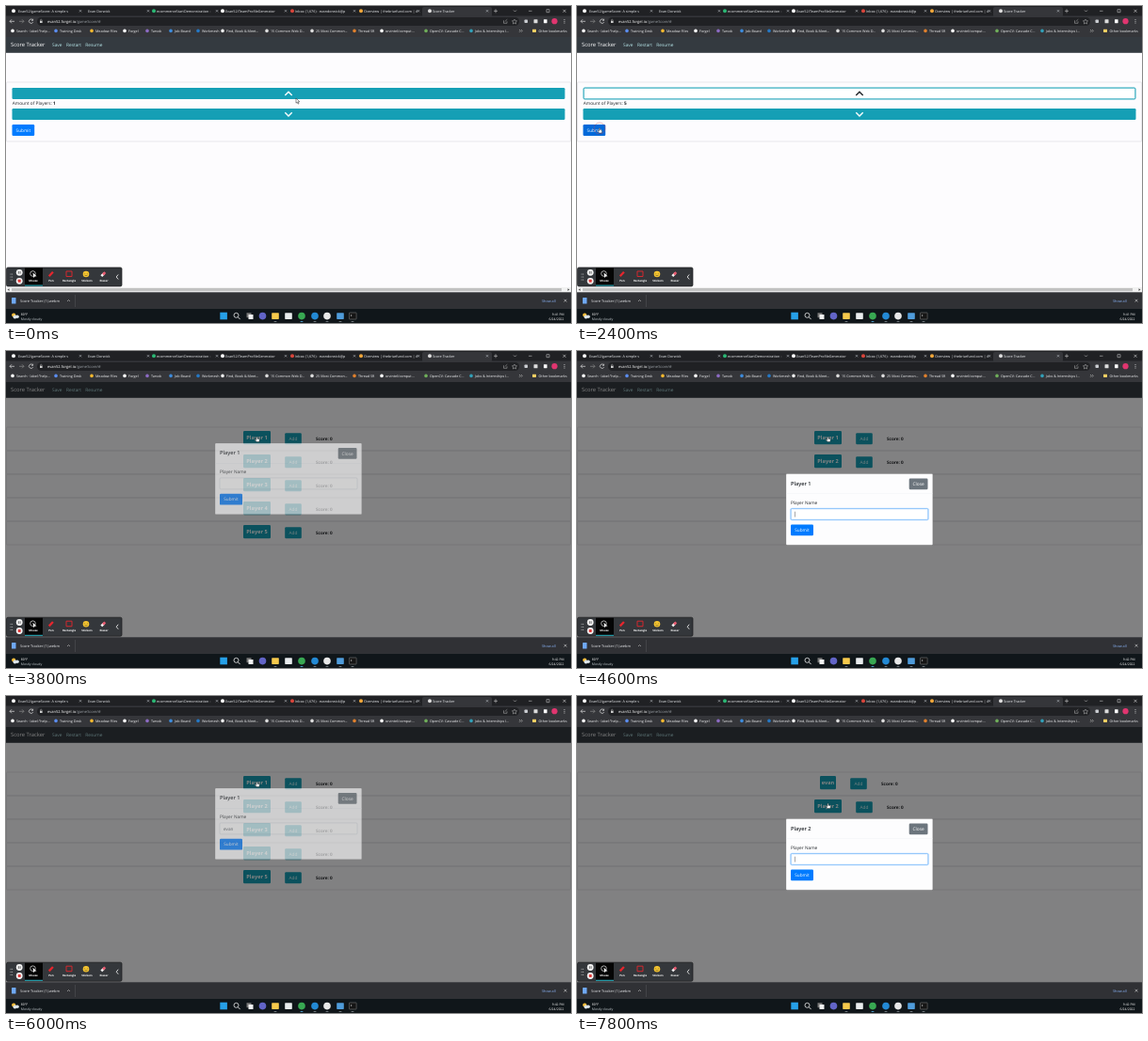
An HTML page for the animation above (8000 ms loop, 600 by 337 pixels).

```html
<!DOCTYPE html>
<html lang="en">
<head>
<meta charset="utf-8">
<title>Score Tracker</title>
<style>
  html, body { margin: 0; width: 100%; height: 100%; overflow: hidden; background: #202124; }
  svg { display: block; width: 100vw; height: 100vh; }
  text { font-family: "Open Sans", "Noto Sans", sans-serif; text-rendering: geometricPrecision; white-space: pre; }
</style>
</head>
<body>
<svg id="stage" viewBox="0 0 600 337">
  <g id="page"></g>
  <rect id="backdrop" y="33" width="600" height="272"/>
  <g id="modal"></g>
  <g id="scrollbar"></g>
  <g id="chrome"></g>
  <g id="recorder"></g>
  <g id="pointer"></g>
</svg>
<script>
const LOOP = 8000, STEP = 200;
const SCROLLBAR = 5.2;
const TEAL = '#159fb5', BLUE = '#007bff', INK = '#212529', BAR = '#35363a';
const $ = id => document.getElementById(id);

const rect = (x, y, w, h, fill, r = 0, extra = '') =>
  `<rect x="${x}" y="${y}" width="${w}" height="${h}" rx="${r}" fill="${fill}" ${extra}/>`;
const dot = (x, y, r, fill) => `<circle cx="${x}" cy="${y}" r="${r}" fill="${fill}"/>`;
const line = (d, stroke, width = 0.7) =>
  `<path d="${d}" fill="none" stroke="${stroke}" stroke-width="${width}"/>`;
const text = (x, y, size, fill, str, extra = '') =>
  `<text x="${x}" y="${y}" font-size="${size}" fill="${fill}" ${extra}>${str}</text>`;
const BOLD = 'font-weight="700"', MID = 'text-anchor="middle"', END = 'text-anchor="end"';
const cross = (x, y, s, color) => line(`M${x - s} ${y - s}l${2 * s} ${2 * s}m0 ${-2 * s}l${-2 * s} ${2 * s}`, color, 0.6);
const button = (x, y, w, h, fill, label, size = 4.7, color = '#fff', extra = '') =>
  rect(x, y, w, h, fill, 1.2) + text(x + w / 2, y + h / 2 + size * 0.36, size, color, label, `${MID} ${extra}`);

// Browser window, recorder toolbar and taskbar
function tabStrip() {
  const tabs = [
    [6, '#fff', 'Evan52/gameScore: A simple s', 79], [0, '', 'Evan Dorwick', 151],
    [155, '#2bb673', 'ecommerceStartDemonstration -', 224], [228, '#fff', 'Evan52/TeamProfileGenerator', 297],
    [302, '#d8453b', 'Inbox (1,676) - evandorwick@p', 370], [375, '#f0a63a', 'Overview | thebriarfund.com | A', 438],
    [448, '#ddd', 'Score Tracker', 511]
  ];
  return rect(0, 0, 600, 11, '#202124') + rect(442, 1, 74, 11, BAR, 2) +
    tabs.map(([x, color, title, close]) =>
      (color ? dot(x + 2, 5.3, 2, color) : '') +
      text(x ? x + 5 + (x === 6 ? 2 : 0) : 87, 6.7, 3.75, '#eceef1', title) +
      cross(close, 5.3, 1.1, '#bdc1c6')).join('') +
    line('M518 5.3h4m-2 -2v4', '#ccc', 0.6) +
    line('M539 4.5l1.5 1.5 1.5-1.5M555 5.3h3.5M574 3.7h3v3h-3z', '#ddd', 0.5) + cross(593, 5.3, 1.5, '#ddd');
}

function toolbar() {
  return rect(0, 10.5, 600, 22.5, BAR) + rect(33, 12, 512, 9, '#202124', 4.5) +
    line('M9 16.3h-5m2-2l-2 2 2 2', '#ddd') + line('M14 16.3h5m-2-2l2 2-2 2', '#888') +
    line('M28.5 15a2.2 2.2 0 1 0 .2 2m-.1-3.3v1.6h-1.6', '#ddd') +
    rect(36, 15.8, 2.6, 2.2, '#ccc') + line('M36.5 16v-1a.8 .8 0 0 1 1.6 0v1', '#ccc', 0.4) +
    text(44, 17.8, 4.05, '#fff', 'evan52.forgel.io<tspan fill="#9aa0a6">/gameScore/#</tspan>') +
    line('M528.5 15.3v3h3.5v-2m-2.3 .3l2.6-2.4M540 14l.8 1.7 1.8.2-1.4 1.2.4 1.9-1.6-1-1.6 1 .4-1.9-1.4-1.2 1.8-.2z', '#bbb', 0.5) +
    rect(550.5, 14.5, 3.5, 3.5, '#c9ccd1', 0.8) + rect(560.5, 14.2, 4, 4, '#ddd', 0.5) + rect(571, 14.2, 3.6, 4, '#fff', 0.4) +
    dot(582.5, 16.2, 3.1, '#e0356f') + [14.5, 16.2, 17.9].map(y => dot(593, y, 0.5, '#ddd')).join('');
}

function bookmarks() {
  const items = [
    [11, '#fff', 'Search · label:"help...'], [57, '#5b8def', 'Training Desk'], [95, '#f5b82e', 'Meadow Files'],
    [130, '#fff', 'Forgel'], [154, '#8d6bc4', 'Tarvok'], [179, '#3d8bdc', 'Job Board'], [208, '#2478c6', 'Workmesh'],
    [234, '#eee', 'Find, Book &amp; Meet...'], [281, '#ddd', '15 Common Web D...'], [329, '#ddd', '25 Most Common...'],
    [374, '#e0802c', 'Thread SR'], [403, '#fff', 'orvintel/comput...'], [450, '#6fae5a', 'OpenCV: Cascade C...'],
    [498, '#32a0b8', 'Jobs &amp; Internships I...']
  ];
  return items.map(([x, color, name]) => dot(x - 4, 26.4, 1.8, color) + text(x, 27.8, 3.7, '#f4f5f7', name)).join('') +
    line('M545 25l1.3 1.4-1.3 1.4m2-2.8l1.3 1.4-1.3 1.4', '#ddd', 0.5) +
    rect(559, 24.7, 4, 3.2, '#f4cf63', 0.4) + text(565.5, 27.8, 3.7, '#f4f5f7', 'Other bookmarks');
}

function recorder() {
  const tools = [[29, 'Mouse'], [48, 'Pen'], [67, 'Rectangle'], [86, 'Stickers'], [104, 'Eraser']];
  return rect(0.5, 278, 122.5, 20, '#34373b', 1.5, 'stroke="#17191b" stroke-width=".7"') + rect(20, 278.5, 19, 19, '#050505') +
    rect(20, 296.6, 19, 1, '#2ab7c6') +
    [285, 288, 291].map(y => dot(5, y, 0.5, '#ccc') + dot(6.7, y, 0.5, '#ccc')).join('') +
    dot(14.2, 283.3, 3.4, '#f3f3f3') + line('M13.3 282v2.7m1.8 0v-2.7', '#333') +
    dot(14.2, 292.3, 3.4, '#f3f3f3') + rect(12.7, 290.8, 3, 3, '#e03c3c', 0.4) +
    `<circle cx="28.5" cy="284.5" r="2.8" fill="none" stroke="#eee" stroke-width=".7"/><path d="M28.5 283.5l4 3.8-2 .1-1.2 1.6z" fill="#fff"/>` +
    line('M45.7 287.2l4.2-4.4', '#e5262e', 2.3) + line('M64 282h6v5.5h-6z', '#e5262e', 0.9) +
    dot(85, 285, 3.3, '#f7c62f') + dot(83.8, 284.2, 0.4, '#333') + dot(86.2, 284.2, 0.4, '#333') + line('M83.3 286q1.7 1.6 3.4 0', '#333', 0.5) +
    line('M101.3 287.2l3-3', '#f1f1f1', 2.6) + line('M103 285.5l2.3-2.3', '#e85a70', 2.6) +
    tools.map(([x, name]) => text(x, 293.2, 2.9, '#fff', name, `${MID} ${BOLD}`)).join('') +
    line('M119.2 285.5l-2 2.5 2 2.5', '#fff', 0.8);
}

const scrollbar = () => rect(0, 299, 600, 5.5, '#f1f1f1') + rect(6, 300, 584, 3.2, '#c1c1c1') +
  '<path d="M1.5 301.6l2-1.4v2.8zM598.5 301.6l-2-1.4v2.8z" fill="#555"/>';

function desktop() {
  const apps = [[272.5, '#6264c7'], [286, '#f6c94c'], [300, '#e9ecee'], [314, '#38a852'], [328, '#2389d4'], [341, '#e8e8e8'], [355, '#4f9cdb']];
  const squares = [286, 300, 355];
  return rect(0, 304.3, 600, 18, '#303135') + rect(6, 310, 4.5, 6.5, '#6fa8f5', 0.5) +
    text(15, 315, 3.9, '#e8eaed', 'Score Tracker (1).webm') + line('M65 314l1.5-1.5 1.5 1.5', '#ccc', 0.6) +
    rect(73, 307, 0.5, 13, '#56585c') + text(569, 314.8, 3.8, '#8ab4f8', 'Show all') + cross(594, 313.2, 1.4, '#ddd') +
    rect(0, 322, 600, 15, '#10161a') +
    dot(8.2, 328.6, 2.1, '#f5bd3b') + dot(9.5, 330.5, 2, '#dce5eb') + dot(12, 330.3, 1.8, '#dce5eb') +
    text(15.8, 328.9, 3.5, '#fff', '80°F') + text(15.8, 333.5, 3.5, '#c6ced2', 'Mostly cloudy') +
    rect(227.3, 325.7, 7.6, 7.6, '#26a0e8') +
    `<circle cx="244.5" cy="328.8" r="2.5" fill="none" stroke="#eee" stroke-width=".8"/>` + line('M246.4 330.8l2.2 2.3', '#eee', 0.9) +
    rect(255.5, 326.2, 5, 5, '#777') + rect(257.5, 328, 5, 5, '#f2f2f2') +
    apps.map(([x, color]) => squares.includes(x) ? rect(x - 3.8, 326.2, 7.6, 6.7, color, 0.6) : dot(x, 329.6, 3.8, color)).join('') +
    rect(364.5, 326, 7.6, 7, '#151515', 0.5, 'stroke="#888" stroke-width=".5"') + line('M366 328l1.2 1-1.2 1', '#eee', 0.5) +
    [286, 314, 328, 341, 355, 368].map(x => rect(x - 1.5, 335.2, 3, 0.7, x === 314 ? '#5bc0f8' : '#8c959a', 0.3)).join('') +
    `<text id="clock" x="592.5" y="328.9" font-size="3.4" fill="#fff" ${END}></text>` +
    text(592.5, 333.5, 3.4, '#fff', '6/24/2022', END);
}

// Web page
const nav = () => rect(0, 33, 600, 272, '#fdfcfe') + rect(0, 33, 600, 16.8, '#343a40') +
  text(5, 43.3, 5.85, '#fff', 'Score Tracker') +
  [[49, 'Save'], [64, 'Restart'], [84.3, 'Resume']].map(([x, s]) => text(x, 43, 4.8, '#b9e9ec', s)).join('');

const box = (y, h) => rect(0.4, y, 599.2, h, 'none', 0.6, 'stroke="#dfdfe2" stroke-width=".7"');

function setupPage(count, upActive, submitHover) {
  const up = upActive
    ? rect(6.5, 86.5, 587, 13, '#bfe3ea', 1.6) + rect(7.1, 87.1, 585.8, 11.8, '#fff', 1, `stroke="${TEAL}" stroke-width="1"`)
    : rect(6.5, 87, 587, 12, TEAL, 1.2);
  return box(81, 63) + up + line('M296.3 94.9l3.7-3.7 3.7 3.7', upActive ? INK : '#fff', 1.4) +
    text(6.8, 105.1, 4.75, INK, `Amount of Players: <tspan ${BOLD}>${count}</tspan>`) +
    rect(6.5, 109, 587, 12, TEAL, 1.2) + line('M296.3 113.2l3.7 3.7 3.7-3.7', '#fff', 1.4) +
    button(6.5, 126, 23.7, 12, submitHover ? '#0069d9' : BLUE, 'Submit');
}

function listPage(firstName, hovered) {
  return Array.from({ length: 5 }, (_, i) => {
    const y = 81 + 25 * i, named = i === 0 && firstName;
    const shift = named ? 6 : 0;
    return box(y, 25) +
      button(252 + shift, y + 4, 29 - 2 * shift, 14.2, TEAL, named || `Player ${i + 1}`, 5.6, i === hovered ? '#101418' : '#fff', BOLD) +
      button(296.2 - shift, y + 6.2, 17.6, 12, TEAL, 'Add', 4.8, '#e6fafc') +
      text(329 - shift, y + 13.6, 4.65, INK, 'Score: 0', BOLD);
  }).join('');
}

function dialog(title, value, focused) {
  const field = focused
    ? rect(226.3, 166.8, 147.4, 13.4, '#bfdeff', 1.8) + rect(227.2, 167.7, 145.6, 11.6, '#fff', 1, 'stroke="#6cb2f8" stroke-width=".7"')
    : rect(227, 167.5, 146, 12, '#fff', 1, 'stroke="#ced4da" stroke-width=".5"');
  return rect(222, 130.5, 155.8, 75.8, '#fdfdfe', 1, 'stroke="#777" stroke-width=".3"') +
    rect(222, 151.6, 155.8, 0.35, '#e9ecef') +
    text(227, 142.5, 5.6, INK, title, 'font-weight="600"') +
    button(352.7, 135.5, 19.8, 11.8, '#6c757d', 'Close', 4.8) +
    text(227, 163, 4.75, INK, 'Player Name') + field +
    `<text id="entry" x="231" y="175.2" font-size="4.7" fill="#495057">${value}</text>` +
    button(227, 184.4, 24, 11.8, BLUE, 'Submit');
}

// Pointer
const path = [[0, 308, 98], [200, 307, 97], [400, 302, 93], [1200, 302, 93], [2200, 24, 130], [2600, 24, 130],
  [3200, 266.6, 91.5], [6200, 266.6, 91.5], [6800, 266.6, 114.5]];
const clicks = [600, 800, 1000, 1200, 2400, 3600, 7000];

function pointerAt(t) {
  const next = path.findIndex(p => p[0] > t);
  if (next < 0) return path[path.length - 1].slice(1);
  const [t0, x0, y0] = path[next - 1], [t1, x1, y1] = path[next];
  const u = (t - t0) / (t1 - t0), e = u * u * (3 - 2 * u);
  return [x0 + (x1 - x0) * e, y0 + (y1 - y0) * e];
}

function pointer(t) {
  const [x, y] = pointerAt(t);
  const hand = (t >= 400 && t <= 1200) || (t >= 2200 && t < 2600) || t >= 3200;
  const shape = hand
    ? 'M-.7 0q.7-.8 1.3 0v2.2l2.2.6q.7.3.5 1.2l-.6 2.2h-3.4l-2-2.7q.4-.9 1.2-.2l.8.6z'
    : 'M0 0v5.2l1.2-1.1 .9 2 .9-.4-.9-1.9h1.7z';
  const ring = !clicks.includes(t) ? '' :
    `<circle cx="${x}" cy="${y}" r="${t === 2400 ? 6 : 10}" fill="none" stroke="#dc3f45" stroke-width="1" opacity="${t === 2400 ? 0.35 : 0.9}"/>`;
  return ring + `<path transform="translate(${x} ${y}) scale(${hand ? 0.8 : 1})" d="${shape}" fill="#fff" stroke="#222" stroke-width=".5"/>`;
}

// Timeline
function modalState(t) {
  if (t < 3800 || (t >= 6200 && t < 7200)) return null;
  const moving = t === 3800 || t === 6000 || t === 7200;
  const typed = Math.max(0, Math.floor((t - 4600) / STEP));
  const second = t >= 7200;
  return { moving, title: second ? 'Player 2' : 'Player 1', value: second ? '' : 'evan'.slice(0, typed) };
}

function draw(t) {
  const modal = modalState(t);
  const count = 1 + clicks.filter(c => c <= 1200 && c <= t).length;
  const hovered = modal ? -1 : t >= 3200 && t <= 6200 ? 0 : t === 6800 ? 1 : -1;
  $('page').innerHTML = nav() + (t < 2600
    ? setupPage(count, t >= 400, t >= 2200)
    : listPage(t >= 6200 ? 'evan' : '', hovered));
  $('backdrop').setAttribute('opacity', modal ? 0.49 : 0);
  $('modal').innerHTML = modal ? dialog(modal.title, modal.value, !modal.moving) : '';
  $('modal').setAttribute('opacity', modal && modal.moving ? 0.62 : 1);
  $('modal').setAttribute('transform', `translate(0 ${modal && modal.moving ? -32.6 : 0})`);
  if (modal && !modal.moving) {
    const caretX = 231.2 + (modal.value ? $('entry').getComputedTextLength() : 0);
    $('modal').insertAdjacentHTML('beforeend', rect(caretX, 170.7, 0.4, 5.8, INK));
  }
  $('scrollbar').setAttribute('opacity', modal ? 0 : 1);
  $('recorder').setAttribute('transform', `translate(0 ${modal ? SCROLLBAR : 0})`);
  $('clock').textContent = t < 2600 ? '9:41 PM' : '9:42 PM';
  $('pointer').innerHTML = pointer(t);
}

$('scrollbar').innerHTML = scrollbar();
$('chrome').innerHTML = tabStrip() + toolbar() + bookmarks() + desktop();
$('recorder').innerHTML = recorder();
const start = performance.now();
let shown = -1;
function tick() {
  const t = Math.floor(((performance.now() - start) % LOOP) / STEP) * STEP;
  if (t !== shown) draw(shown = t);
  requestAnimationFrame(tick);
}
tick();
</script>
</body>
</html>
```
